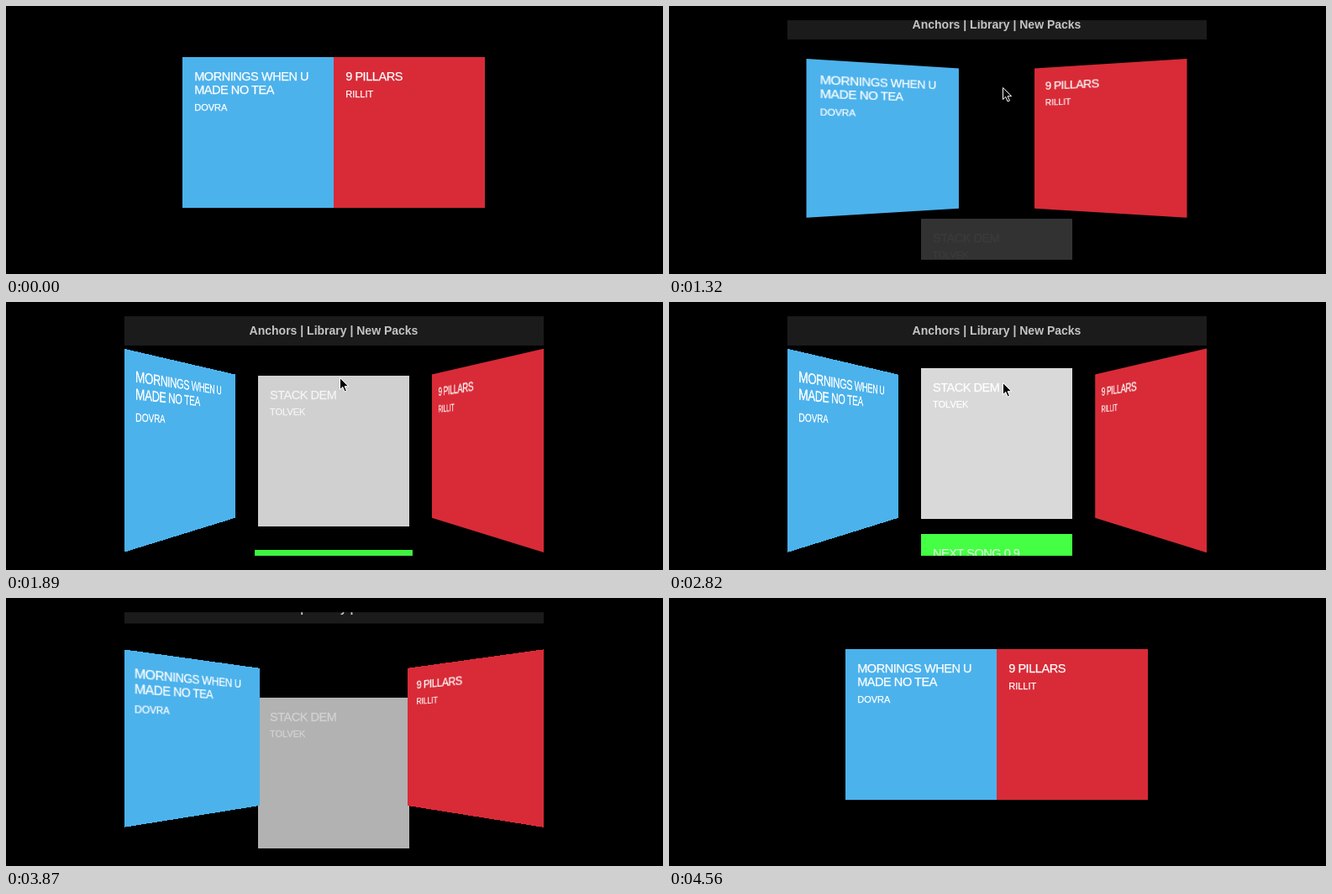
An HTML page for the animation above (4680 ms loop, 782 px wide and 320 px high).

```html
<!DOCTYPE html>
<html lang="en">
<head>
<meta charset="utf-8">
<title>Music packs</title>
<style>
  html, body { margin: 0; width: 100%; height: 100%; overflow: hidden; background: #000; }
  #view {
    position: absolute; left: 141px; top: 17px; width: 499px; height: 286px;
    overflow: hidden; perspective: 540px; perspective-origin: 249px 143px;
  }
  svg { position: absolute; display: block; }
  .layer { left: 0; top: 0; }
  .card { top: 44px; width: 180px; height: 180px; }
  #blue { left: 69px; }
  #red { left: 249px; }
  text { font-family: "Liberation Sans", Arial, sans-serif; fill: #fff; }
  .song, .artist { stroke: #fff; stroke-width: .25px; }
  .song { font-size: 14.5px; letter-spacing: -.45px; }
  .artist { font-size: 11px; }
  .menu { font-size: 14px; font-weight: bold; fill: #c4c4c4; text-anchor: middle; }
</style>
</head>
<body>
<div id="view">
  <svg class="layer" width="499" height="286" viewBox="141 17 499 286">
    <g id="next">
      <rect x="-90" width="180" height="180" fill="#44ff44"/>
      <text class="song" x="-76" y="27.5" opacity=".75">NEXT SONG 0.9</text>
    </g>
    <g id="now">
      <rect width="180" height="180" fill="#d9d9d9"/>
      <text class="song" x="14" y="27.5">STACK DEM</text>
      <text class="artist" x="14" y="47">TOLVEK</text>
    </g>
  </svg>
  <svg id="blue" class="card" viewBox="0 0 180 180">
    <rect width="180" height="180" fill="#4cb2ec"/>
    <text class="song" x="14.2" y="28">MORNINGS WHEN U</text>
    <text class="song" x="14.2" y="44">MADE NO TEA</text>
    <text class="artist" x="14.2" y="64">DOVRA</text>
  </svg>
  <svg id="red" class="card" viewBox="0 0 180 180">
    <rect width="180" height="180" fill="#d82b37"/>
    <text class="song" x="14.2" y="28">9 PILLARS</text>
    <text class="artist" x="14.2" y="48">RILLIT</text>
  </svg>
  <svg class="layer" width="499" height="286" viewBox="141 17 499 286">
    <g id="header">
      <rect x="141" y="17" width="499" height="35" fill="#1b1b1b"/>
      <text class="menu" x="390" y="39">Anchors | Library | New Packs</text>
    </g>
    <path id="cursor" d="M.5 .5V14.6L3.8 11.5L6.1 17L8.4 16L6.1 10.7H10.6Z"
          fill="#000" stroke="#fff" stroke-linejoin="round"/>
  </svg>
</div>
<script>
  const LOOP = 4680, STEP = 30;
  const el = id => document.getElementById(id);
  const [blue, red, now, next, header, cursor] =
    ["blue", "red", "now", "next", "header", "cursor"].map(el);

  const clamp = u => Math.min(1, Math.max(0, u));
  const cubic = u => u < .5 ? 4 * u ** 3 : 1 - 4 * (1 - u) ** 3;
  const smooth = u => u * u * (3 - 2 * u);
  const ramp = (t, from, dur) => cubic(clamp((t - from) / dur));

  // 0 = closed, 1 = open
  const openness = (t, open, openDur, close, closeDur) =>
    ramp(t, open, openDur) - ramp(t, close, closeDur);

  // time, x, y of the pointer tip
  const path = [
    [720, 446, 306], [1200, 397, 97], [1320, 397, 97], [1700, 397, 90],
    [2340, 397, 90], [2490, 397, 96], [2820, 397, 96], [2910, 397, 92], [3330, 462, 306]
  ];

  function pointer(t) {
    if (t <= path[0][0]) return path[0].slice(1);
    for (let i = 1; i < path.length; i++) {
      const [t0, x0, y0] = path[i - 1], [t1, x1, y1] = path[i];
      if (t < t1) {
        const u = smooth((t - t0) / (t1 - t0));
        return [x0 + (x1 - x0) * u, y0 + (y1 - y0) * u];
      }
    }
    return path[path.length - 1].slice(1);
  }

  function turn(card, side, p) {
    const a = 70 * p;
    const x = 2.3 * a - .0198 * a * a;
    const z = .0232 * a * a - .81 * a;
    card.style.transform =
      `translate3d(${side * x}px, ${.312 * a}px, ${z}px) rotateY(${-side * a}deg)`;
  }

  function draw(t) {
    const bar = openness(t, 748, 1024, 3315, 1024);
    const sides = openness(t, 807, 1190, 3372, 1190);
    const mid = openness(t, 772, 1424, 3387, 1368);
    const low = openness(t, 785, 1430, 3387, 1368);

    turn(blue, -1, sides);
    turn(red, 1, sides);
    header.setAttribute("transform", `translate(0 ${-35 * (1 - bar)})`);

    now.setAttribute("transform", `translate(300 ${Math.round(79 + 227 * (1 - mid))})`);
    now.setAttribute("opacity", mid);

    const drop = Math.round(400 * (1 - low));
    next.setAttribute("transform", `translate(390 ${277 + drop}) scale(${1 + .0023 * drop})`);
    next.setAttribute("opacity", low);

    cursor.setAttribute("transform", `translate(${pointer(t)})`);
  }

  const start = performance.now();
  function tick() {
    const t = (performance.now() - start) % LOOP;
    draw(Math.floor(t / STEP) * STEP);
    requestAnimationFrame(tick);
  }
  tick();
</script>
</body>
</html>
```
